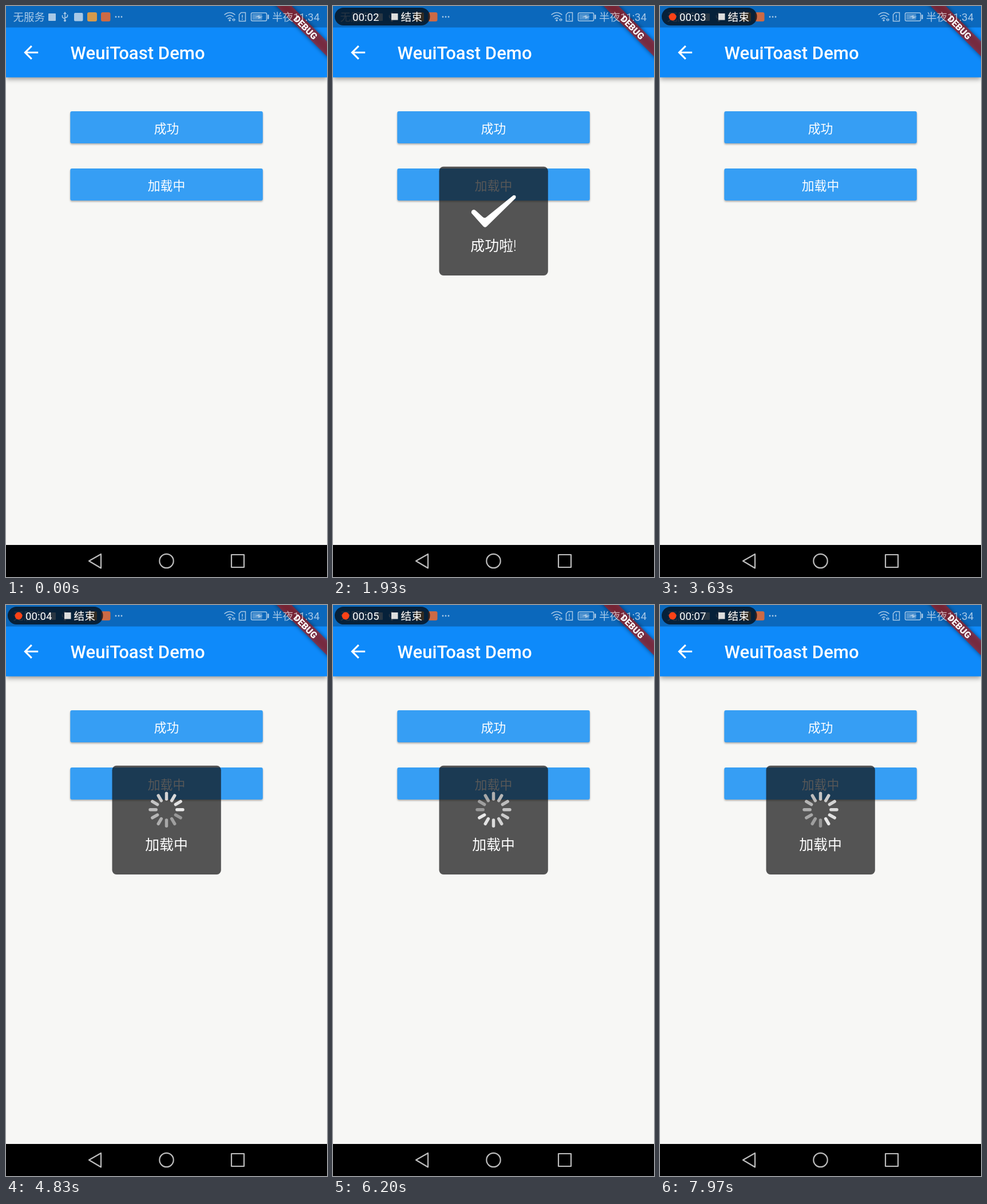
An HTML page that plays this animation: 561 by 998 pixels, repeating every 8 s.

```html
<!DOCTYPE html>
<html lang="zh-CN">
<head>
<meta charset="utf-8">
<style>
html, body { margin: 0; width: 100%; height: 100%; overflow: hidden; background: #f7f7f5 }
svg { display: block; width: 561px; height: 998px; font-family: Roboto, "Noto Sans CJK SC", sans-serif; fill: #fff }
.mid { text-anchor: middle }
.line { fill: none; stroke: #fff; stroke-width: 1.5 }
.bar { filter: drop-shadow(0 3px 4px rgba(0,0,0,.4)) }
.key { filter: drop-shadow(0 2px 1.5px rgba(0,0,0,.3)) }
.blur { filter: blur(3.5px) }
</style>
</head>
<body>
<svg viewBox="0 0 561 998">
  <defs>
    <clipPath id="clip0"><rect x="112.300" y="184" width="336.500" height="56" rx="3"/></clipPath>
    <clipPath id="clip1"><rect x="112.300" y="284" width="336.500" height="56" rx="3"/></clipPath>
  </defs>
  <rect width="561" height="998" fill="#f7f7f5"/>

  <g class="bar"><rect y="-10" width="561" height="134.700" fill="#0e8afa"/></g>
  <rect width="561" height="37.5" fill="rgba(0,0,0,.25)"/>
  <path transform="translate(25 62.5) scale(1.558)" d="M20 11H7.83l5.59-5.59L12 4l-8 8 8 8 1.41-1.41L7.83 13H20z"/>
  <text x="112.600" y="93.300" font-size="31.1" font-weight="500">WeuiToast Demo</text>

  <g font-size="21.8" font-weight="500" class="mid">
    <rect class="key" x="112.300" y="184" width="336.500" height="56" rx="3" fill="#369ef4"/>
    <g clip-path="url(#clip0)"><circle class="ink" cx="280.500" cy="212" fill="#c8c8c8"/></g>
    <text x="280.500" y="222.300">成功</text>
    <rect class="key" x="112.300" y="284" width="336.500" height="56" rx="3" fill="#369ef4"/>
    <g clip-path="url(#clip1)"><circle class="ink" cx="280.500" cy="312" fill="#c8c8c8"/></g>
    <text x="280.500" y="322.300">加载中</text>
  </g>

  <g id="toast" font-size="24.9" font-weight="300" class="mid">
    <rect x="185.500" y="280.700" width="190.300" height="190.300" rx="7.500" fill="rgba(17,17,17,.7)"/>
    <g id="success">
      <path d="M246 356Q241 357 242 362L263 385.500Q266 388 269 385L319 336Q321 330 315 331L268 369Q265 371.500 262 369L250 358Q248 356 246 356z"/>
      <text x="280.500" y="428">成功啦!</text>
    </g>
    <g id="loading">
      <g id="blades" transform="translate(280.500 357.700)"></g>
      <text x="280.500" y="428">加载中</text>
    </g>
  </g>

  <g transform="translate(561) rotate(45)">
    <rect class="blur" x="-90" y="43.600" width="180" height="18.700" fill="rgba(0,0,0,.5)"/>
    <rect x="-90" y="43.600" width="180" height="18.700" fill="rgba(183,28,28,.63)"/>
    <text class="mid" y="58.800" font-size="15.900" font-weight="900">DEBUG</text>
  </g>

  <g id="status" opacity=".64" font-size="18.500">
    <text x="12.500" y="26">无服务</text>
    <rect x="74" y="13" width="13" height="13" rx="1"/>
    <path class="line" d="M103 12V26M98.500 16V19Q99 21 103 22M107.500 15V18Q107 20 103 20.500"/>
    <path d="M100 14l3-4 3 4z"/><circle cx="103" cy="25.500" r="2"/>
    <rect x="119" y="12" width="15.500" height="14.500" rx="2"/>
    <circle cx="192" cy="19" r="1.400"/><circle cx="197" cy="19" r="1.400"/><circle cx="202" cy="19" r="1.400"/>
    <path class="line" d="M381.500 15.500Q391 7.500 400.500 15.500M384.500 19Q391 13.500 397.500 19M387.500 22.500Q391 19.500 394 22"/>
    <circle cx="391" cy="25" r="1.700"/>
    <path d="M395 24l2.500-3v6zM401 24l-2.500-3v6z"/>
    <path class="line" d="M411 11.500H418.500V26.500H407.500V15zM413 15.500V20.500M413 22V24"/>
    <rect class="line" x="428.500" y="12" width="27" height="14" rx="2"/>
    <rect x="430.500" y="14" width="17" height="10" opacity=".45"/>
    <rect x="457" y="15" width="2.500" height="8" rx="1"/>
    <path d="M435 19.500l8-3.500v2.500h6l-8 4v-3z"/>
    <text x="465" y="26">半夜11:34</text>
  </g>
  <rect x="142" y="11" width="17" height="16" rx="3" fill="#d59a4c"/>
  <rect x="166" y="11" width="16.500" height="16" rx="3" fill="#cc6a45"/>

  <g id="pill" font-size="18.700">
    <rect x="3" y="3" width="166.500" height="31" rx="15.500" fill="rgba(6,14,22,.78)"/>
    <circle id="dot" cx="22" cy="19" r="6.500" fill="#fb4217"/>
    <text id="clock" x="34" y="26"></text>
    <rect x="102" y="13" width="11.500" height="11.500" fill="#ddd"/>
    <text x="118.500" y="26">结束</text>
  </g>

  <rect y="942" width="561" height="56" fill="#000"/>
  <g fill="none" stroke="#bdbdbd" stroke-width="2.200" stroke-linejoin="round">
    <path d="M145 970L166 958V982.500z"/>
    <circle cx="280.500" cy="970" r="12.200"/>
    <rect x="394" y="959" width="22" height="22"/>
  </g>
</svg>
<script>
const LOOP = 8000, SPIN = 1000;
const seconds = [870, 1930, 2970, 3930, 5000, 6230, 7300];
const presses = [450, 3930];
const $ = id => document.getElementById(id);
const ramp = (t, from, to) => Math.min(1, Math.max(0, (t - from) / (to - from)));
const show = (el, alpha) => el.setAttribute('opacity', alpha);

const blades = Array.from({ length: 12 }, (_, i) => {
  const blade = document.createElementNS('http://www.w3.org/2000/svg', 'rect');
  const box = { x: -2.73, y: -31.2, width: 5.46, height: 15.6, rx: 2.73, transform: `rotate(${i * 30})` };
  for (const name in box) blade.setAttribute(name, box[name]);
  return $('blades').appendChild(blade);
});
const inks = document.querySelectorAll('.ink');

function draw(t) {
  const count = seconds.filter(s => s <= t).length;
  const began = count ? seconds[count - 1] : -100;
  $('clock').textContent = '00:0' + count;
  show($('dot'), t - began >= 500 ? 1 : 0);
  show($('pill'), ramp(t, 100, 300));

  inks.forEach((ink, i) => {
    const age = t - presses[i];
    ink.setAttribute('r', 175 * Math.sqrt(ramp(age, 0, 320)));
    show(ink, .28 * ramp(age, 0, 80) * (1 - ramp(age, 200, 400)));
  });

  const first = t < 4000;
  show($('toast'), first ? ramp(t, 870, 1030) * (1 - ramp(t, 3370, 3630)) : ramp(t, 4300, 4500));
  show($('success'), first ? 1 : 0);
  show($('loading'), first ? 0 : 1);

  // The darkest blade steps clockwise; brightness climbs from it around the ring.
  const dark = Math.floor((t - 6200) / SPIN * 12 + 9.08);
  blades.forEach((blade, i) => {
    const level = 152 + 7.4 * ((i - dark + 120) % 12);
    blade.setAttribute('fill', `rgb(${level},${level},${level})`);
  });
}

const start = performance.now();
(function frame() {
  draw((performance.now() - start) % LOOP);
  requestAnimationFrame(frame);
})();
</script>
</body>
</html>
```
